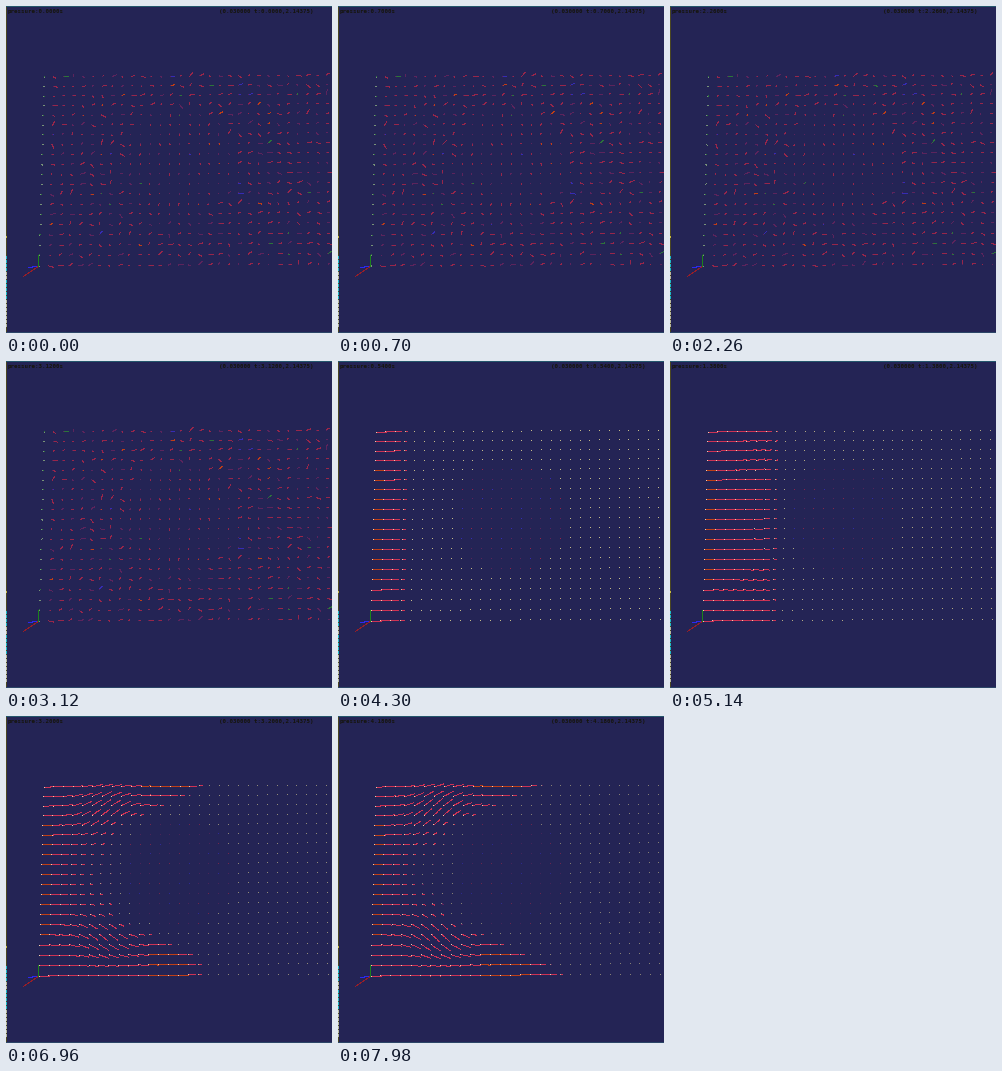
Animation, 326 px wide and 327 px high, one loop 8 s. Source, as a matplotlib script:

```python
import numpy as np
import matplotlib.pyplot as plt
from matplotlib.animation import FuncAnimation

W, H, DPI = 326, 327, 64
PX = 72 / DPI
COLS, ROWS = 30, 20
TICK, LOOP = 20, 8000
RESTART = 3760
MID = 157


def rgb(*c):
    return np.array(c) / 255


BG = rgb(36, 36, 85)
PINK, ORANGE = rgb(204, 50, 84), rgb(190, 62, 22)
NODE, IDLE = rgb(245, 200, 170), rgb(196, 186, 138)
PLUM, RED, BLUE = rgb(92, 36, 92), rgb(152, 38, 74), rgb(54, 44, 180)
GREEN, SAGE = rgb(44, 116, 58), rgb(120, 146, 120)

# Slightly tilted perspective grid, row 0 at the bottom
j, i = np.mgrid[0:ROWS, 0:COLS]
left = 33 + 5 * j / (ROWS - 1)
right = 322 - 2 * j / (ROWS - 1)
gx = (left + (right - left) * i / (COLS - 1)).ravel()
gy = (260 - 10.4 * j + 0.024 * j**2 - 2 * i / (COLS - 1)).ravel()
col, row = i.ravel(), j.ravel()
nodes = np.column_stack([gx, gy])
core = np.hypot(gx - 172, gy - MID) < 57
inlet = col == 0
dy = gy - MID

rng = np.random.default_rng(7)
N = COLS * ROWS
angle = np.where(core, np.pi / 2, 0) + rng.normal(0, 0.6, N)
size = np.where(core, rng.uniform(0.3, 2, N), rng.uniform(0.6, 5, N))
size[inlet] = 1
phase = rng.uniform(0, 2 * np.pi, N)
pick = rng.random(N)


def choose(default, *options):
    """Give each node the first colour whose condition holds."""
    out = np.tile(default, (N, 1))
    for cond, color in reversed(options):
        out[cond] = color
    return out


swirl_line = choose(RED, (inlet & (row % 2 == 0), SAGE), (inlet, GREEN),
                    (pick < 0.02, BLUE), (pick < 0.05, GREEN),
                    (pick < 0.07, ORANGE), (pick < 0.35, PLUM))
swirl_dot = choose(PLUM, (inlet, SAGE), (pick > 0.6, RED))
idle_dot = choose(IDLE, (core & (pick < 0.12), BLUE), (core & (pick < 0.4), RED),
                  (core, PLUM))


def step_time(t):
    """Redraws come in a 20, 20, 100 ms rhythm."""
    lag = 60 if t >= 4200 else 0
    k, r = divmod(t - lag, 140)
    return k * 140 + min(r, 40) + lag


def swirl(t):
    a = angle + 0.1 * np.sin(t / 600 + phase)
    v = size[:, None] * np.column_stack([np.cos(a), np.sin(a)])
    return v, swirl_line, swirl_dot


def inflow(t):
    front = np.interp(t, [RESTART, 4300, 6100, 6960, LOOP],
                      [38, 66, 148, 195, 225])
    block = np.interp(t, [4300, 6100, 6960, LOOP], [0, 0.5, 0.85, 1])
    # The obstacle slows the middle rows and turns the flow around it
    slow = np.exp(-(dy / 48)**2) * np.clip((gx - 36) / 45, 0, 1)
    u = 1 - block * slow
    w = np.sign(dy) * 0.75 * block * np.exp(
        -((np.abs(dy) - 62) / 24)**2 - ((gx - 95) / 32)**2)
    edge = np.minimum(front, 108 + 2.2 * np.maximum(np.abs(dy) - 45, 0))
    reach = np.clip((edge + 6 - gx) / 26, 0, 1)
    reach[inlet] = 1
    v = 10 * np.column_stack([u, w]) * reach[:, None]
    length = np.hypot(v[:, 0], v[:, 1])

    fast = (np.abs(dy) > 80) & (np.abs(gx - 160) < 25) & (length > 9)
    line = choose(PINK, (inlet & (row > 3) & (row < 16), ORANGE),
                  (fast & (t > 6800), ORANGE), (length < 1.5, PLUM))
    heat = np.clip(length / 5, 0, 1)[:, None]
    fade = np.interp(t, [4300, 6100, LOOP], [0, 0.25, 0.4])
    rest = idle_dot * (1 - fade) + BG * fade
    return v, line, rest * (1 - heat) + NODE * heat


def plot(img, xy, color):
    """Set single hard-edged pixels."""
    x, y = np.floor(xy).astype(int).T
    ok = (x >= 0) & (x < W) & (y >= 0) & (y < H)
    img[y[ok], x[ok]] = color[ok]


def strokes(img, start, vec, color, steps=14):
    for s in np.linspace(1, 0, steps):
        plot(img, start + s * vec, color)


base = np.tile(BG, (H, W, 1))
base[0] = rgb(36, 86, 108)
base[-1] = rgb(44, 70, 104)
base[1:-1, 0] = rgb(75, 71, 34)
base[230:232, 0] = rgb(200, 184, 64)
for y in range(250, 322, 4):
    cyan = y < 264 or 274 <= y < 294
    base[y:y + 3, 0] = rgb(32, 184, 200) if cyan else rgb(184, 184, 160)

gizmo_start = np.full((3, 2), [32.5, 260.5])
gizmo_vec = np.array([[-10, 0.9], [-15, 9.5], [0, -11]])
gizmo_color = np.array([rgb(44, 40, 240), rgb(150, 30, 40), rgb(28, 130, 28)])

fig = plt.figure(figsize=(W / DPI, H / DPI), dpi=DPI)
ax = fig.add_axes([0, 0, 1, 1])
ax.axis("off")
screen = ax.imshow(base, extent=(0, W, H, 0), interpolation="nearest",
                   aspect="auto")

style = dict(family="DejaVu Sans Mono", size=5.7 * PX, color="#16150c",
             va="center", weight="bold")
info = ax.text(2, 5, "", **style)
stats = ax.text(213, 5, "", **style)


def draw(n):
    t = step_time(n * TICK)
    v, line, dot = swirl(t) if t < RESTART else inflow(t)
    img = base.copy()
    strokes(img, nodes, v, line)
    plot(img, nodes, dot)
    strokes(img, gizmo_start, gizmo_vec, gizmo_color, 30)
    screen.set_data(img)
    clock = t / 1000 if t < RESTART else (t - RESTART) / 1000
    info.set_text(f"pressure:{clock:.4f}s")
    stats.set_text(f"(0.030000 t:{clock:.4f},2.14375)")
    return screen, info, stats


anim = FuncAnimation(fig, draw, frames=LOOP // TICK, interval=TICK,
                     repeat=True, repeat_delay=0, blit=False)
plt.show()
```
